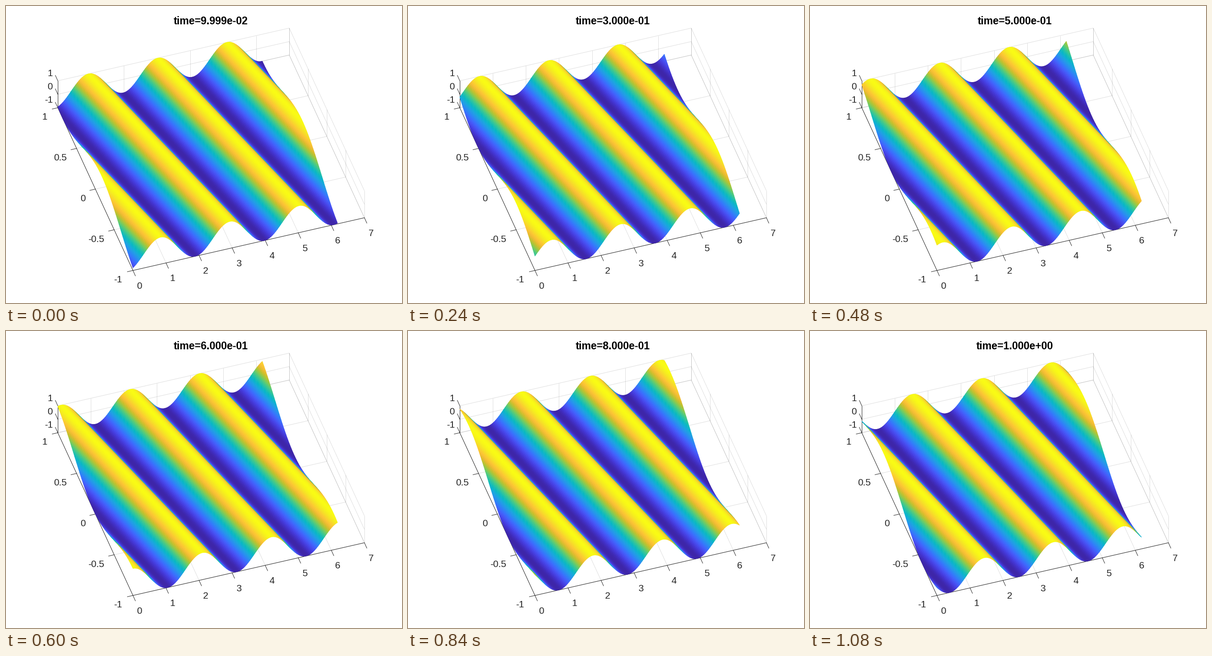
A matplotlib script for the animation above (1.2 s loop, 864 by 648 pixels).

```python
import numpy as np
import matplotlib.pyplot as plt
from matplotlib.animation import FuncAnimation
from matplotlib.colors import LinearSegmentedColormap

W, H, DPI = 864, 648, 100
FRAMES, STEP_MS = 10, 120
INK = "#262626"
PX = 72 / DPI  # points per pixel

PARULA = LinearSegmentedColormap.from_list("parula", [
    "#3E26A8", "#4332CB", "#4741E5", "#4852F4", "#4563FD", "#3875FE",
    "#2E87F7", "#2797EB", "#20A5E3", "#12B1D6", "#02BAC3", "#24C1AE",
    "#37C897", "#57CC7A", "#81CC59", "#ABC739", "#D1BF27", "#F0BA36",
    "#FEC338", "#FAD62D", "#F5E924", "#F9FB15"])


def project(x, y, z):
    """Orthographic view of the axes box, in pixels from the top left."""
    return (277 + 72.14 * x - 82 * (y + 1),
            577 - 16.43 * x - 177.5 * (y + 1) - 29.4 * (z + 1))


plt.rcParams["font.family"] = "Liberation Sans"
fig = plt.figure(figsize=(W / DPI, H / DPI), dpi=DPI, facecolor="white")
ax = fig.add_axes([0, 0, 1, 1])
ax.set_xlim(0, W)
ax.set_ylim(H, 0)
ax.axis("off")


def segment(a, b, **style):
    (x0, y0), (x1, y1) = project(*a), project(*b)
    ax.plot([x0, x1], [y0, y1], lw=PX, solid_capstyle="butt", **style)


def grid(a, b):
    segment(a, b, color=INK, alpha=0.15, zorder=1)


def axis(a, b):
    segment(a, b, color=INK, zorder=1.5)


def tick(pos, direction, label, dx, dy, ha):
    px, py = project(*pos)
    ax.plot([px, px + direction[0]], [py, py + direction[1]],
            color=INK, lw=PX, zorder=1.5)
    ax.text(px + dx, py + dy + 7.4, label, color=INK, fontsize=20.6 * PX,
            ha=ha, va="baseline", zorder=3)


XT = range(8)
YT = (-1, -0.5, 0, 0.5, 1)
ZT = (-1, 0, 1)

# floor, back wall and right wall
for x in XT:
    grid((x, -1, -1), (x, 1, -1))
    grid((x, 1, -1), (x, 1, 1))
for y in YT:
    grid((0, y, -1), (7, y, -1))
    grid((7, y, -1), (7, y, 1))
for z in ZT:
    grid((0, 1, z), (7, 1, z))
    grid((7, -1, z), (7, 1, z))

axis((0, -1, -1), (7, -1, -1))
axis((0, -1, -1), (0, 1, -1))
axis((0, 1, -1), (0, 1, 1))

for x in XT:
    tick((x, -1, -1), (5.3, 11.8), f"{x}", 14.3, 32.5, "center")
for y in YT:
    dx = -23.5 if abs(y) == 1 else -21.3
    tick((0, y, -1), (-12.2, 2.8), f"{y:g}", dx, 19, "right")
for z in ZT:
    tick((0, 1, z), (-5.3, -11.8), f"{z}", -11, -18, "right")

title = ax.text(446.5, 39.7, "", color="black", fontsize=22.7 * PX,
                weight="bold", ha="center", va="baseline", zorder=3)

# rows run from far to near, so nearer cells cover farther ones
X, Y = np.meshgrid(np.linspace(2 * np.pi * 63 / 64, 0, 127),
                   np.linspace(1, -1, 121))
surface = None


def update(i):
    global surface
    t = 0.1 * (i + 1) - 6e-6
    title.set_text(f"time={t:.3e}")
    Z = np.cos(3 * (X + Y) + 5 * t)
    if surface is not None:
        surface.remove()
    surface = ax.pcolormesh(*project(X, Y, Z), Z, shading="gouraud",
                            cmap=PARULA, vmin=-1, vmax=1, zorder=2)
    return surface, title


anim = FuncAnimation(fig, update, frames=FRAMES, interval=STEP_MS,
                     repeat=True, repeat_delay=0, blit=False)
plt.show()
```
